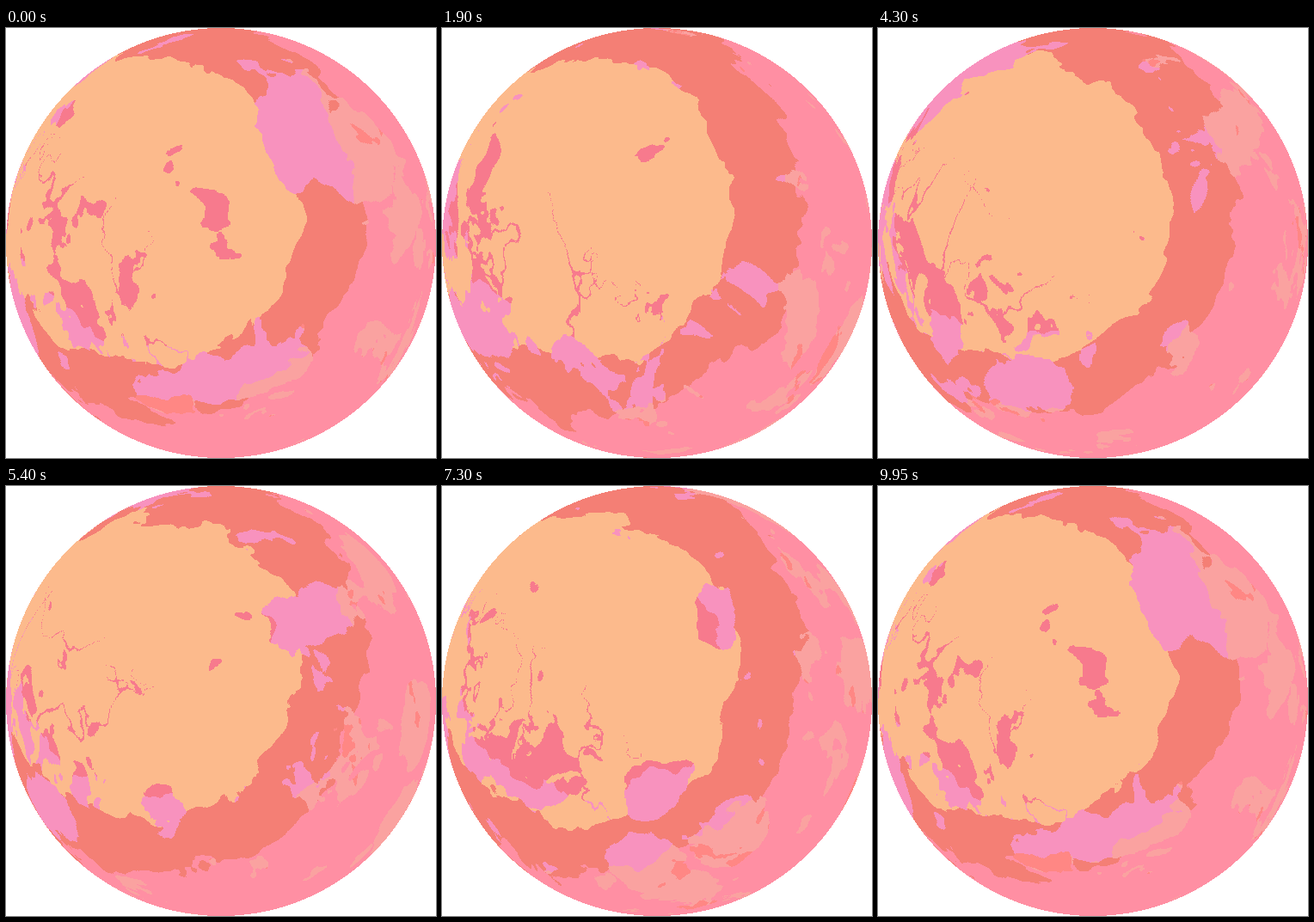
Animation, 500 px wide and 500 px high, one loop 10000 ms. Source, as an HTML page with a canvas:

```html
<!DOCTYPE html>
<html lang="en">
<head>
<meta charset="utf-8">
<title>Planet</title>
<style>
html, body { margin: 0; width: 100%; height: 100%; overflow: hidden; background: #fff; }
canvas { display: block; width: 500px; height: 500px; }
</style>
</head>
<body>
<canvas id="stage" width="500" height="500"></canvas>
<script>
const start = performance.now();
const SIZE = 500, MID = 250, LOOP = 10000, STEP = 50, TAU = Math.PI * 2;
const W = 1200, H = 600, N = W * H;
const TILT = 25 * Math.PI / 180, CT = Math.cos(TILT), ST = Math.sin(TILT);
const LIT = 178, DUSK = 245;

const rgb = (r, g, b) => (255 << 24 | b << 16 | g << 8 | r) >>> 0;
const PEACH = rgb(252, 186, 140), SALMON = rgb(244, 127, 117), PINK = rgb(255, 143, 163);
const HOT = rgb(247, 122, 141), LILAC = rgb(248, 146, 190);
const PALE = rgb(250, 162, 160), CORAL = rgb(255, 135, 132);

const mix = (a, b, t) => a + (b - a) * t;
const clamp = t => Math.min(1, Math.max(0, t));
const ease = t => t * t * (3 - 2 * t);

// Seeded value noise
let seed = 11;
const rnd = () => (seed = (seed * 16807) % 2147483647) / 2147483647;
const perm = new Uint8Array(512), val = new Float32Array(256);
for (let i = 0; i < 256; i++) { perm[i] = i; val[i] = rnd() * 2 - 1; }
for (let i = 255; i > 0; i--) {
  const j = Math.floor(rnd() * (i + 1));
  [perm[i], perm[j]] = [perm[j], perm[i]];
}
perm.copyWithin(256, 0, 256);

function noise(x, y, z) {
  const xi = Math.floor(x), yi = Math.floor(y), zi = Math.floor(z);
  const u = ease(x - xi), v = ease(y - yi), w = ease(z - zi);
  const a = perm[xi & 255], b = perm[(xi + 1) & 255];
  const y0 = yi & 255, y1 = (yi + 1) & 255, z0 = zi & 255, z1 = (zi + 1) & 255;
  const aa = perm[a + y0], ab = perm[a + y1], ba = perm[b + y0], bb = perm[b + y1];
  const near = mix(mix(val[perm[aa + z0]], val[perm[ba + z0]], u),
                   mix(val[perm[ab + z0]], val[perm[bb + z0]], u), v);
  const far = mix(mix(val[perm[aa + z1]], val[perm[ba + z1]], u),
                  mix(val[perm[ab + z1]], val[perm[bb + z1]], u), v);
  return mix(near, far, w);
}
const fbm = (x, y, z) =>
  noise(x * 5, y * 5, z * 5) * .55 + noise(x * 11, y * 11, z * 11) * .3 +
  noise(x * 25, y * 25, z * 25) * .18;

// The largest regions: time seen, x, y, rx, ry
const regions = [
  [0, 332, 122, 48, 66], [0, 405, 155, 48, 52], [0, 222, 408, 50, 32],
  [950, 366, 258, 28, 38], [950, 145, 395, 65, 30],
  [2850, 282, 362, 32, 52], [2850, 105, 272, 45, 20],
  [4300, 182, 415, 45, 34], [4300, 412, 118, 32, 48],
  [6450, 374, 140, 34, 50], [6450, 360, 435, 45, 40],
  [8200, 112, 318, 32, 52], [8200, 213, 408, 45, 36], [8200, 425, 268, 45, 42]
];

// Bake the surface into longitude / latitude maps
const map = () => new Float32Array(N);
const rough = map(), grain = map(), vein = map(), land = map();
for (let row = 0, i = 0; row < H; row++) {
  const lat = ((row + .5) / H - .5) * Math.PI, up = Math.sin(lat), ring = Math.cos(lat);
  for (let col = 0; col < W; col++, i++) {
    const lon = (col + .5) / W * TAU, px = ring * Math.sin(lon), pz = ring * Math.cos(lon);
    const warp = noise(px * 4 + 9, up * 4 + 9, pz * 4 + 9) * .12;
    const n = rough[i] = fbm(px + 7 + warp, up + 3 - warp, pz + 5);
    const m = grain[i] = fbm(px + 20, up + 31 + warp, pz + 17 + warp);
    vein[i] = Math.abs(noise(px * 5 + n + 40, up * 3 + m + 50, pz * 5 + 60));
    land[i] = -2;
    for (const [time, cx, cy, rx, ry] of regions) {
      const turn = lon - time / LOOP * TAU, depth = ring * Math.cos(turn);
      if (up * ST + depth * CT < 0) continue;
      const dx = (MID + MID * ring * Math.sin(turn) + n * 26 - cx) / rx;
      const dy = (MID - MID * (up * CT - depth * ST) + m * 26 - cy) / ry;
      land[i] = Math.max(land[i], 1 - dx * dx - dy * dy + n * .4);
    }
  }
}

// Visible disc: map position, distances from the light, share of rugged ground
const cells = [];
for (let y = 0; y < SIZE; y++) {
  for (let x = 0; x < SIZE; x++) {
    const px = (x + .5 - MID) / MID, up = (MID - y - .5) / MID, r2 = px * px + up * up;
    if (r2 >= 1) continue;
    const z = Math.sqrt(1 - r2), turn = Math.atan2(px, z * CT - up * ST);
    cells.push([
      y * SIZE + x,
      Math.floor((Math.asin(up * CT + z * ST) / Math.PI + .5) * H) * W,
      Math.floor((turn / TAU + 1) * W) % W,
      Math.hypot(x - 165, y - 210), Math.hypot(x - 175, y - 205),
      clamp((y - x - 60) / 200)
    ]);
  }
}
const pick = (Type, k) => Type.from(cells, c => c[k]);
const at = pick(Int32Array, 0), rowAt = pick(Int32Array, 1), colAt = pick(Int32Array, 2);
const inner = pick(Float32Array, 3), outer = pick(Float32Array, 4);
const rugged = pick(Float32Array, 5);

const ctx = document.getElementById('stage').getContext('2d');
const image = ctx.createImageData(SIZE, SIZE);
const pixels = new Uint32Array(image.data.buffer).fill(0xffffffff);

function draw(time) {
  const shift = Math.round(time / LOOP * W);
  for (let j = 0; j < at.length; j++) {
    const i = rowAt[j] + (colAt[j] + shift) % W;
    const n = rough[i], m = grain[i], d = inner[j], q = rugged[j];
    const lit = d + n * 24 < LIT;

    // Regions melt in full light, veins open on the rugged lower left
    const melt = clamp((170 - d) / 60) * (1 - q) * 1.6;
    const cover = land[i] > melt ||
      m > (d < LIT ? .56 - q * .38 : .36) ||
      (lit && vein[i] < .07 * q);

    let c = lit ? PEACH : outer[j] + n * 28 < DUSK ? SALMON : PINK;
    if (cover) {
      const e = d + n * 28;
      c = e < 150 ? HOT : e < 236 ? LILAC : n > .38 ? CORAL : PALE;
    }
    pixels[at[j]] = c;
  }
  ctx.putImageData(image, 0, 0);
}

let last = -1;
function tick() {
  const time = Math.floor((performance.now() - start) % LOOP / STEP) * STEP;
  if (time !== last) draw(last = time);
  requestAnimationFrame(tick);
}
draw(0);
requestAnimationFrame(tick);
</script>
</body>
</html>
```
